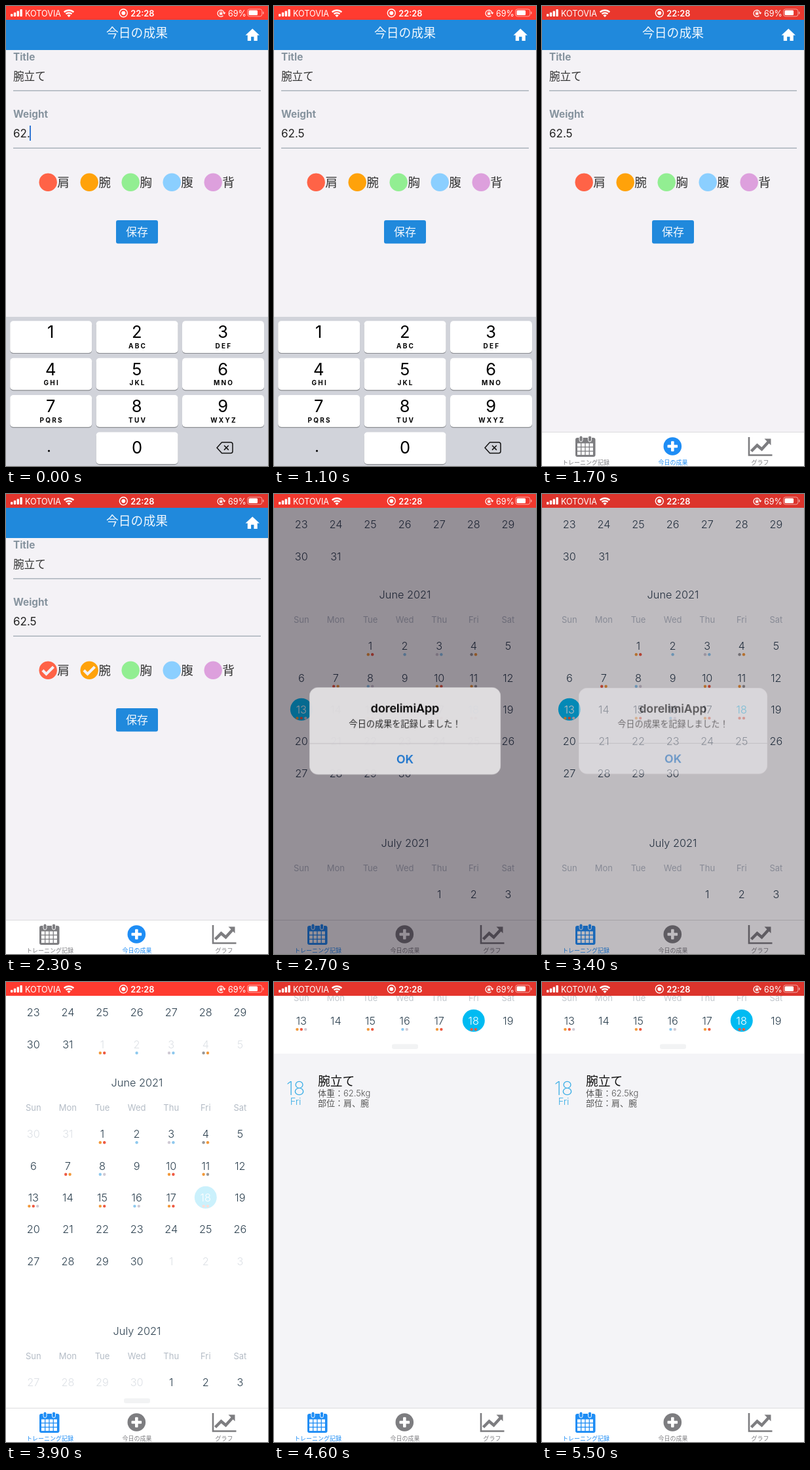
Animation of 400 by 700 pixels, one loop 5600 ms. Source, as an HTML page:

```html
<!DOCTYPE html>
<html lang="ja">
<head>
<meta charset="utf-8">
<title>Training log</title>
<style>
html, body { margin: 0; width: 100%; height: 100%; overflow: hidden; background: #f4f2f6; }
svg { display: block; width: 400px; height: 700px; }
text { font-family: Inter, "Noto Sans CJK JP", "Noto Sans CJK", sans-serif; white-space: pre; }

/* Hard switches */
.scene, .before, .typed, .caret, .check1, .check2, .save, .early, .late, .dim, .alert, .glass, .tab1, .tab2 {
  animation: 5600ms step-end infinite;
}
.before { animation-name: before; }
.typed { animation-name: typed; }
.caret { animation-name: caret; }
.check1 { animation-name: check1; }
.check2 { animation-name: check2; }
.save { animation-name: save; }
.scene { animation-name: scene; }
.early { animation-name: early; }
.late { animation-name: late; }
.dim { animation-name: dim; }
.alert { animation-name: alert; transform-origin: 200px 360.5px; }
.glass { animation-name: glass; }
.tab1 { animation-name: tab1; }
.tab2 { animation-name: tab2; }

/* Smooth motion */
.keyboard { animation: keyboard 5600ms linear infinite; }
.sheet { animation: sheet 5600ms linear infinite; }
.month { animation: month 5600ms linear infinite; }
.heading { animation: heading 5600ms linear infinite; }
.picked { animation: picked 5600ms linear infinite; }
.pulse { animation: pulse 5600ms ease-in-out infinite; }

@keyframes before { 0% { opacity: 1 } 8.9%, 100% { opacity: 0 } }
@keyframes typed { 0% { opacity: 0 } 8.9%, 100% { opacity: 1 } }
@keyframes caret { 0% { opacity: 0 } 8.9% { opacity: 1 } 17.8%, 100% { opacity: 0 } }
@keyframes check1 { 0% { opacity: 0 } 33.9%, 100% { opacity: 1 } }
@keyframes check2 { 0% { opacity: 0 } 39.2%, 100% { opacity: 1 } }
@keyframes save { 0% { opacity: 1 } 44.6% { opacity: .3 } 46.4%, 100% { opacity: 1 } }
@keyframes scene { 0% { opacity: 0 } 46.4%, 100% { opacity: 1 } }
@keyframes early { 0% { opacity: 1 } 67.8%, 100% { opacity: 0 } }
@keyframes late { 0% { opacity: 0 } 67.8%, 100% { opacity: 1 } }
@keyframes tab1 { 0% { color: #7d7d80 } 46.4%, 100% { color: #1e8df5 } }
@keyframes tab2 { 0% { color: #1e8df5 } 46.4%, 100% { color: #7d7d80 } }
@keyframes dim {
  0% { opacity: 0 } 46.4% { opacity: .22 } 48.2% { opacity: .435 }
  58.9% { opacity: .37 } 60.7% { opacity: .265 } 62.4% { opacity: .1 } 64.2%, 100% { opacity: 0 }
}
@keyframes alert {
  0% { opacity: 0; transform: scale(1.1) }
  46.4% { opacity: .6; transform: scale(1.08) }
  48.2% { opacity: 1; transform: scale(1.014) }
  50% { opacity: 1; transform: none }
  58.9% { opacity: .8; transform: none }
  60.7% { opacity: .53; transform: none }
  62.4% { opacity: .2; transform: none }
  64.2%, 100% { opacity: 0; transform: none }
}
@keyframes glass { 0% { fill: #e1dee1 } 58.9% { fill: #e8e5e8 } 60.7%, 100% { fill: #f3f0f4 } }
@keyframes keyboard {
  0%, 23.2% { transform: none; animation-timing-function: ease-in-out }
  28.6%, 100% { transform: translateY(229px) }
}
@keyframes sheet {
  0%, 71.4% { transform: none; animation-timing-function: ease-in-out }
  82.1%, 100% { transform: translateY(-539px) }
}
@keyframes month {
  0%, 71.4% { transform: none; animation-timing-function: ease-in-out }
  82.1%, 100% { transform: translateY(270px) }
}
@keyframes heading { 0%, 78% { opacity: 0 } 82.1%, 100% { opacity: 1 } }
@keyframes picked {
  0%, 67.79% { opacity: 0 } 67.8%, 71.4% { opacity: .2 } 75%, 100% { opacity: 1 }
}
@keyframes pulse {
  0%, 17%, 20%, 35%, 52%, 69.5%, 88.5% { fill: #ff3b30 }
  8%, 27%, 43.5%, 61%, 79%, 98.2% { fill: #dc342c }
  100% { fill: #e2362d }
}
</style>
</head>
<body>
<svg id="stage" viewBox="0 0 400 700"></svg>
<script>
const CJK = /[\u3040-\u9fff]/;
const BLUE = '#2089dc', SELECTED = '#00bbf2', INK = '#2d4150';

// y is the optical middle of the line
function text(x, y, size, str, fill, { weight = 400, anchor = 'middle', extra = '' } = {}) {
  const cjk = CJK.test(str);
  const base = (y + size * (cjk ? .365 : .363)).toFixed(2);
  return `<text x="${x}" y="${base}" font-size="${size}" font-weight="${cjk ? 300 : weight}" fill="${fill}" text-anchor="${anchor}" ${extra}>${str}</text>`;
}
const left = (x, y, size, str, fill, weight = 400, extra = '') =>
  text(x, y, size, str, fill, { weight, anchor: 'start', extra });
const rect = (x, y, w, h, fill, rx = 0, extra = '') =>
  `<rect x="${x}" y="${y}" width="${w}" height="${h}" fill="${fill}" rx="${rx}" ${extra}/>`;
const circle = (x, y, r, fill, extra = '') => `<circle cx="${x}" cy="${y}" r="${r}" fill="${fill}" ${extra}/>`;
const path = (d, fill, extra = '') => `<path d="${d}" fill="${fill}" ${extra}/>`;
const line = (d, color, width, extra = '') =>
  path(d, 'none', `stroke="${color}" stroke-width="${width}" ${extra}`);
const group = (cls, ...parts) => `<g class="${cls}">${parts.join('')}</g>`;
const each = (n, fn) => Array.from({ length: n }, (_, i) => fn(i)).join('');

function form() {
  const parts = [['肩', '#ff6347'], ['腕', '#ffa20a'], ['胸', '#92ee92'], ['腹', '#8bcfff'], ['背', '#dda0dd']];
  const choices = parts.map(([name, color], i) => {
    const x = 64.2 + 63 * i;
    const tick = i < 2 ? group('check' + (i + 1),
      line(`M${x - 8.3} 268.3l5.6 5.6l11-11`, '#f4f2f6', 4.2)) : '';
    return circle(x, 268.2, 13.7, color) + tick + left(x + 14, 268.5, 18.7, name, '#333');
  }).join('');
  return rect(0, 0, 400, 700, '#f4f2f6') +
    rect(0, 21, 400, 46, BLUE) +
    text(200, 41, 18.8, '今日の成果', '#f0f7fd') +
    path('M365.5 44.5L376.3 34.5L387 44.5h-3.2v8.5h-5.3v-6.2h-4.4v6.2h-5.3v-8.5z', '#fff') +
    left(11, 77, 15.3, 'Title', '#86939e', 700) +
    left(11, 106.5, 16.6, '腕立て', '#333') +
    rect(11, 128.4, 378, 1, '#86939e') +
    left(11, 164, 15.3, 'Weight', '#86939e', 700) +
    group('before', left(11, 194, 17, '62.', '#222'), rect(36, 182, 2, 23, '#3478d4')) +
    group('typed', left(11, 194, 17, '62.5', '#222')) +
    group('caret', rect(47.5, 182, 2, 23, '#3478d4')) +
    rect(11, 215.7, 378, 1, '#86939e') +
    choices +
    group('save', rect(168, 326, 64, 35.5, BLUE, 3), text(200, 343.7, 17, '保存', '#f0f7fd'));
}

const DOTS = { 1: 'or', 2: 'b', 3: 'pb', 4: 'go', 7: 'ro', 8: 'bp', 10: 'or', 11: 'og', 13: 'orp', 15: 'or', 16: 'bp', 17: 'or', 18: 'rr' };
const DOT_COLORS = { o: '#f2993a', r: '#ee5a42', b: '#8fc9ee', p: '#d0cad4', g: '#98989a' };
const WEEK = ['Sun', 'Mon', 'Tue', 'Wed', 'Thu', 'Fri', 'Sat'];
const colX = col => 41.8 + 52.6 * col;

function day(col, y, n, fill, dotted) {
  const marks = dotted && DOTS[n] || '';
  const x = colX(col);
  return text(x, y, 16.3, n, fill, { weight: 300 }) +
    [...marks].map((m, i) => circle(x + (i - (marks.length - 1) / 2) * 6.4, y + 13, 2.2, DOT_COLORS[m])).join('');
}
const faded = (col, y, n, dotted) => day(col, y, n, '#dde1e6', dotted);
const weekdays = (y, fill) => WEEK.map((w, i) => text(colX(i), y, 13, w, fill)).join('');
const monthTitle = (y, name) => text(200, y, 16.3, name, INK, { weight: 300 });

function juneDay(i) {
  const n = i + 1, col = (n + 1) % 7, y = 231.3 + 48.4 * Math.floor((n + 1) / 7);
  const disc = circle(colX(col), y - 1.3 + 1, 17, SELECTED);
  const plain = color => day(col, y, n, color, true);
  if (n === 13) return group('early', disc, plain('#fff')) + group('late', plain(INK));
  if (n === 18) return group('early', plain(SELECTED)) + group('picked', disc, plain('#fff'));
  return plain(INK);
}

function calendar() {
  const neighbours = each(5, i => faded(i + 2, 95, i + 1, true)) +
    each(2, i => faded(i, 231.3, 30 + i)) +
    each(3, i => faded(i + 4, 424.9, i + 1)) +
    each(4, i => faded(i, 609, 27 + i));
  const months = each(7, i => day(i, 46.5, 23 + i, INK)) +
    each(2, i => day(i, 95, 30 + i, INK)) +
    monthTitle(153.5, 'June 2021') + weekdays(191.5, '#b4bcc6') + each(30, juneDay) +
    monthTitle(531.5, 'July 2021') + weekdays(569.5, '#b4bcc6') +
    each(3, i => day(i + 4, 609, i + 1, INK)) +
    group('late', neighbours);
  const agenda = rect(0, 21, 400, 627, '#f4f4f7') +
    text(33, 161, 29, '18', '#3aaee6', { weight: 200 }) +
    text(33, 182, 14.5, 'Fri', '#3aaee6', { weight: 300 }) +
    left(67, 151.5, 18.8, '腕立て', '#111') +
    left(67, 169.5, 13, '体重：62.5kg', '#555') +
    left(67, 184.5, 13, '部位：肩、腕', '#555');
  const sheet = `<g class="sheet"><g clip-path="url(#page)">` +
    rect(0, 0, 400, 648, '#fff') + group('month', months) +
    rect(0, 624, 400, 24, '#fff') +
    group('late', rect(180, 633.5, 40, 7.5, '#f2f3f4', 3)) + '</g></g>';
  return group('scene', agenda, sheet,
    group('heading', rect(0, 21, 400, 13, '#fff'), weekdays(24.5, '#c2c7cd')));
}

function tabs() {
  const c = 'currentColor';
  const rings = [59.5, 73].map(x => rect(x - 2.5, 654, 5, 9, c, 2.5, 'stroke="#fff" stroke-width="1"')).join('');
  const cells = each(12, i => rect(54 + 6.3 * (i % 4), 665.5 + 6.3 * Math.floor(i / 4), 5, 5, '#fff'));
  return rect(0, 648, 400, 52, '#fff') + rect(0, 648, 400, 1, '#dcdcde') +
    group('tab1', rect(51, 657, 30.5, 29, c, 3), cells, rings, text(67, 695, 9, 'トレーニング記録', c)) +
    group('tab2', circle(199.3, 670, 13.8, c), rect(191.5, 667.7, 15.6, 4.6, '#fff', 1),
      rect(197, 662.2, 4.6, 15.6, '#fff', 1), text(200, 695, 9, '今日の成果', c)) +
    `<g color="#7d7d80">` + line('M316 656V683.5H351.5', c, 2.6) +
    line('M319.5 677.5L328.5 668.5L335.5 674.5L346 663', c, 4.4) +
    path('M339.5 658.5H349.5V668.5Z', c) + text(333, 695, 9, 'グラフ', c) + '</g>';
}

function keyboard() {
  const letters = ['', 'ABC', 'DEF', 'GHI', 'JKL', 'MNO', 'PQRS', 'TUV', 'WXYZ'];
  const key = (x, y) => rect(x, y + 1, 125, 48.8, '#898b90', 5) + rect(x, y, 125, 48.6, '#fff', 5);
  const digits = letters.map((str, i) => {
    const x = 6.2 + 131.4 * (i % 3), y = 479.3 + 56.4 * Math.floor(i / 3), mid = x + 62.5;
    return key(x, y) + text(mid - .4, y + 16.8, 25.5, i + 1, '#000') +
      text(mid + 1, y + 37.8, 10, str, '#000', { weight: 700, extra: 'letter-spacing="2.2"' });
  }).join('');
  return group('keyboard', rect(0, 473, 400, 229, '#d1d3da'), digits,
    key(137.6, 648.5), text(200, 672, 25.5, '0', '#000'),
    circle(65.5, 677, 1.6, '#000'),
    line('M329.5 664H343Q346 664 346 667V677.5Q346 680.5 343 680.5H329.5L322 672.2Z', '#111', 1.5, 'stroke-linejoin="round"'),
    line('M333 668.8l6.8 6.8m0-6.8l-6.8 6.8', '#111', 1.5));
}

function dialog() {
  return group('dim', rect(0, 21, 400, 679, '#0c0210')) +
    group('alert', rect(56, 295, 288, 131, '#e1dee1', 13.5, 'class="glass" fill-opacity=".97"'),
      text(200, 326.5, 17.6, 'dorelimiApp', '#000', { weight: 600 }),
      text(200, 349.5, 13, '今日の成果を記録しました！', '#222'),
      rect(56, 379, 288, .8, '#b9b6ba'),
      text(200, 403, 17.6, 'OK', '#1a73cc', { weight: 600 }));
}

function statusBar() {
  const w = '#fff';
  return rect(0, 0, 400, 21, '#ff3b30', 0, 'class="pulse"') +
    each(4, i => rect(7 + 4.8 * i, 12 - 2.3 * i, 3.4, 4 + 2.3 * i, w, 1)) +
    left(29, 11, 12.6, 'KOTOVIA', w) +
    line('M88.7 9.4A10.6 10.6 0 0 1 103.3 9.4M91.5 12.2A6.6 6.6 0 0 1 100.5 12.2', w, 2.4) +
    path('M93.3 14.2A4 4 0 0 1 98.7 14.2L96 17Z', w) +
    circle(179.3, 10.7, 6, 'none', `stroke="${w}" stroke-width="1.4"`) + circle(179.3, 10.7, 3, w) +
    text(208.3, 11, 12.8, '22:28', w, { weight: 600 }) +
    line('M331.5 14.8A5 5 0 1 1 333 10.5', w, 1.2) + path('M331 9.8h4.4l-2.2 3z', w) +
    rect(326, 10, 4.4, 3.6, w, .5) + line('M326.9 10V9a1.3 1.3 0 0 1 2.6 0v1', w, .8) +
    left(339, 11, 12.6, '69%', w) +
    rect(368.8, 4.8, 22, 11, 'none', 3, `stroke="${w}" stroke-opacity=".55"`) +
    rect(370.5, 6.5, 13.6, 7.6, w, 1.5) + rect(392, 8.4, 1.5, 4, w, .7, 'opacity=".55"');
}

document.getElementById('stage').innerHTML =
  '<clipPath id="page"><rect width="400" height="648"/></clipPath>' +
  form() + calendar() + tabs() + keyboard() + dialog() + statusBar();
</script>
</body>
</html>
```
